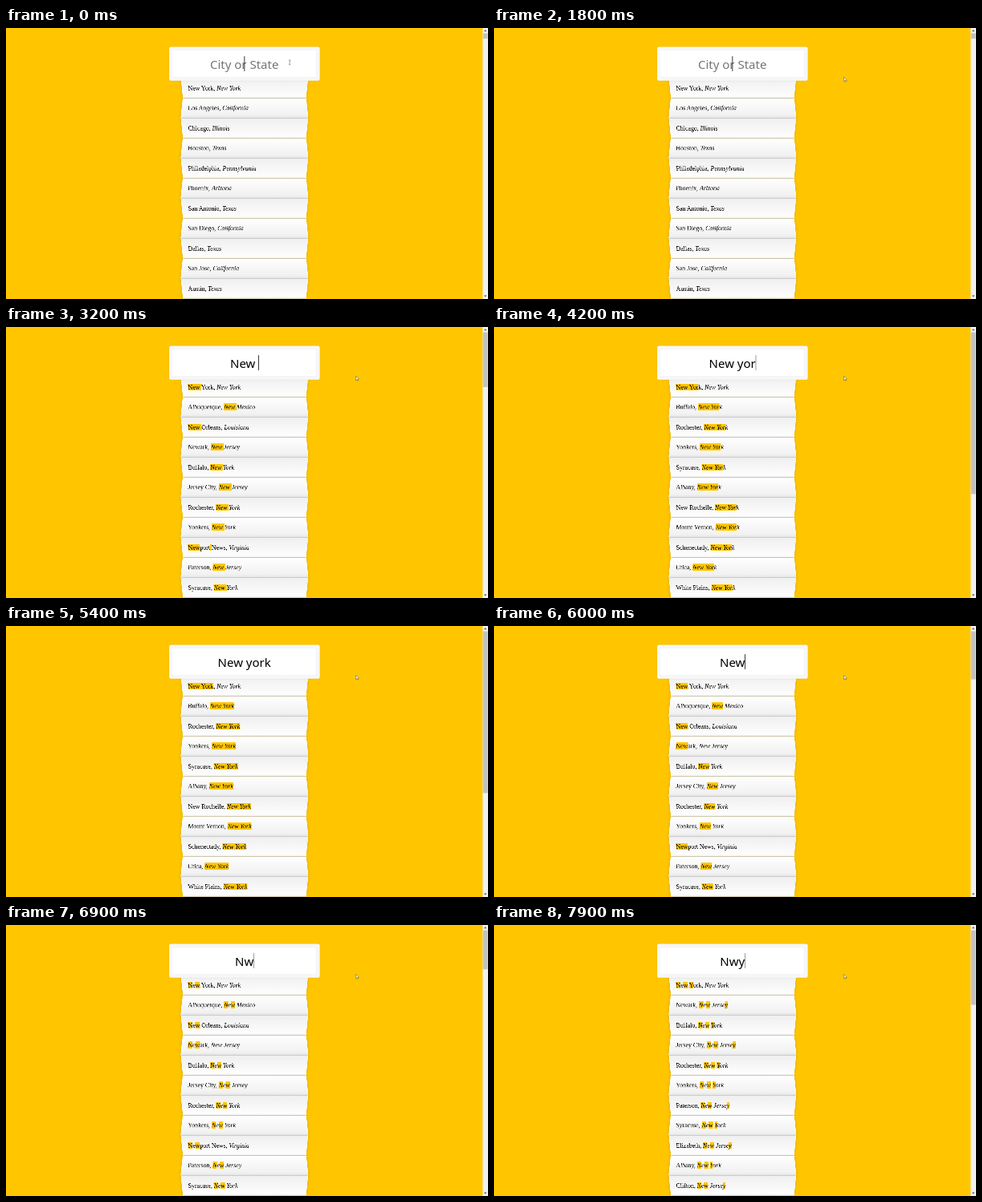
An HTML page for the animation above (8 s loop, 600 by 338 pixels).

```html
<!DOCTYPE html>
<html lang="en">
<head>
<meta charset="utf-8">
<title>City search</title>
<style>
  html, body { margin: 0; width: 100%; height: 100%; overflow: hidden; background: #ffc600; }
  * { box-sizing: border-box; }
  #page { position: absolute; left: 0; top: 0; width: 1536px; height: 866px; overflow: hidden;
    transform: scale(.390625); transform-origin: 0 0; font: 20px/23px "Liberation Serif", serif; color: #000; }
  #search { position: absolute; z-index: 2; left: 519.5px; top: 60px; width: 480px; height: 108px;
    padding: 20px; border: 10px solid #f7f7f7; border-radius: 5px; background: #fff; text-align: center;
    font: 38.4px/48px "Noto Sans", "Open Sans", sans-serif; white-space: pre;
    box-shadow: 0 0 5px rgba(0,0,0,.12), inset 0 0 2px rgba(0,0,0,.19); }
  #query { position: relative; top: 1px; }
  #query.hint { color: #757575; }
  #caret { position: absolute; top: 20px; width: 1.6px; height: 48px; background: #000; }
  #list { position: absolute; left: 559.5px; top: 158px; width: 400px; margin: 0; padding: 0; }
  #list li { list-style: none; height: 64px; padding: 20px; white-space: pre;
    border-bottom: 1px solid #d8d8d8; box-shadow: 0 0 10px rgba(0,0,0,.14); }
  #list li:nth-child(odd) { transform: perspective(100px) rotateX(-3deg) translateY(3px);
    background: linear-gradient(to top, #fff, #efefef); }
  #list li:nth-child(even) { transform: perspective(100px) rotateX(3deg) translateY(2px) scale(1.001);
    background: linear-gradient(to bottom, #fff, #efefef); }
  mark { background: #ffc600; color: inherit; }
  svg { position: absolute; z-index: 3; left: 0; top: 0; }
</style>
</head>
<body>
<div id="page">
  <div id="search"><span id="query"></span><i id="caret"></i></div>
  <ul id="list"></ul>
  <svg width="1536" height="866" viewBox="0 0 1536 866">
    <rect x="1519" width="17" height="866" fill="#f1f1f1"/>
    <path d="M1523 11l4.5-5 4.5 5zM1523 854l4.5 5 4.5-5z" fill="#505050"/>
    <rect id="thumb" x="1520" y="17" width="15" fill="#c1c1c1"/>
    <path id="beam" d="M-3-7.5H-1L0-6.5 1-7.5H3M0-6.5V6.5M-3 7.5H-1L0 6.5 1 7.5H3" fill="none" stroke="#333" stroke-width="1.2"/>
    <path id="arrow" d="M0 0V13.6L3.1 10.7 5.3 15.4 7.3 14.5 5.2 10H9.6Z" fill="#fff" stroke="#222" stroke-width="1"/>
  </svg>
</div>
<script>
const $ = id => document.getElementById(id);
const LOOP = 8000, STEP = 100, BLINK = 265, ROWS = 12, VIEW = 865, TRACK = 831;

const places = `New York|New York;Los Angeles|California;Chicago|Illinois;Houston|Texas
Philadelphia|Pennsylvania;Phoenix|Arizona;San Antonio|Texas;San Diego|California;Dallas|Texas
San Jose|California;Austin|Texas;Indianapolis|Indiana;Jacksonville|Florida
San Francisco|California;Columbus|Ohio;Charlotte|North Carolina;Fort Worth|Texas
Detroit|Michigan;El Paso|Texas;Memphis|Tennessee;Seattle|Washington;Denver|Colorado
Boston|Massachusetts;Nashville-Davidson|Tennessee;Las Vegas|Nevada;Milwaukee|Wisconsin
Albuquerque|New Mexico;Long Beach|California;New Orleans|Louisiana;Newark|New Jersey
Buffalo|New York;Jersey City|New Jersey;Rochester|New York;Yonkers|New York
Newport News|Virginia;Paterson|New Jersey;Syracuse|New York;Elizabeth|New Jersey
Albany|New York;Clifton|New Jersey;New Rochelle|New York;Mount Vernon|New York
Schenectady|New York;Utica|New York;White Plains|New York`
  .split(/[;\n]/).map(s => s.split('|'));

// Number of hits in the full directory; sets the scrollbar length.
const hits = { '': 1000, N: 850, Ne: 325, New: 70, 'New ': 61, 'New y': 44,
  'New yo': 18.5, 'New yor': 18.5, 'New york': 18.5, Nw: 87, Nwy: 44 };

const keys = [[0, ''], [2200, 'N'], [2500, 'Ne'], [2800, 'New'], [3100, 'New '], [3700, 'New y'],
  [3900, 'New yo'], [4200, 'New yor'], [4600, 'New york'], [5700, 'New yor'], [5800, 'New yo'],
  [5900, 'New '], [6000, 'New'], [6100, 'N'], [6200, ''], [6700, 'N'], [6900, 'Nw'],
  [7000, 'Nw'], [7800, 'Nwy']];

// Marks the letters of q, in order, inside text; null if they do not all occur.
function fuzzy(text, q) {
  let n = 0, out = '';
  for (const ch of text) {
    const hit = n < q.length && ch.toLowerCase() === q[n].toLowerCase();
    if (hit) n++;
    out += hit ? `<mark>${ch}</mark>` : ch;
  }
  return n === q.length ? out.replaceAll('</mark><mark>', '') : null;
}

function rowsFor(q) {
  const rows = [];
  for (const [city, state] of places) {
    const a = fuzzy(city, q), b = a === null ? fuzzy(state, q) : state;
    if (b !== null) rows.push(`${a ?? city}, <em>${b}</em>`);
  }
  return rows;
}

const items = Array.from({ length: ROWS }, () => $('list').appendChild(document.createElement('li')));
let shown = null;

function show(q) {
  if (q === shown) return;
  shown = q;
  const rows = rowsFor(q), query = $('query');
  items.forEach((li, i) => li.innerHTML = rows[i] || '');
  query.textContent = q || 'City or State';
  query.className = q ? '' : 'hint';
  $('caret').style.left = 229.5 + (q ? query.offsetWidth / 2 : 0) + 'px';
  $('thumb').setAttribute('height', Math.max(17, TRACK * VIEW / (208 + 64 * hits[q])));
}

function moveMouse(t) {
  const p = Math.min(1, Math.max(0, (t - 100) / 800)), e = p * p * (3 - 2 * p);
  const x = 904 + 211 * e, y = 110 + 47 * e, inside = x < 999;
  for (const [id, on] of [['beam', inside], ['arrow', !inside]]) {
    $(id).setAttribute('transform', `translate(${x} ${y})`);
    $(id).setAttribute('visibility', on ? 'visible' : 'hidden');
  }
}

function draw(now) {
  const t = Math.floor(now % LOOP / STEP) * STEP;
  const [since, q] = keys.findLast(k => k[0] <= t);
  show(q);
  $('caret').style.opacity = Math.floor((t - since) / BLINK) % 2 ? 0 : 1;
  moveMouse(t);
}

const start = performance.now();
function tick() {
  draw(performance.now() - start);
  requestAnimationFrame(tick);
}
tick();
</script>
</body>
</html>
```
